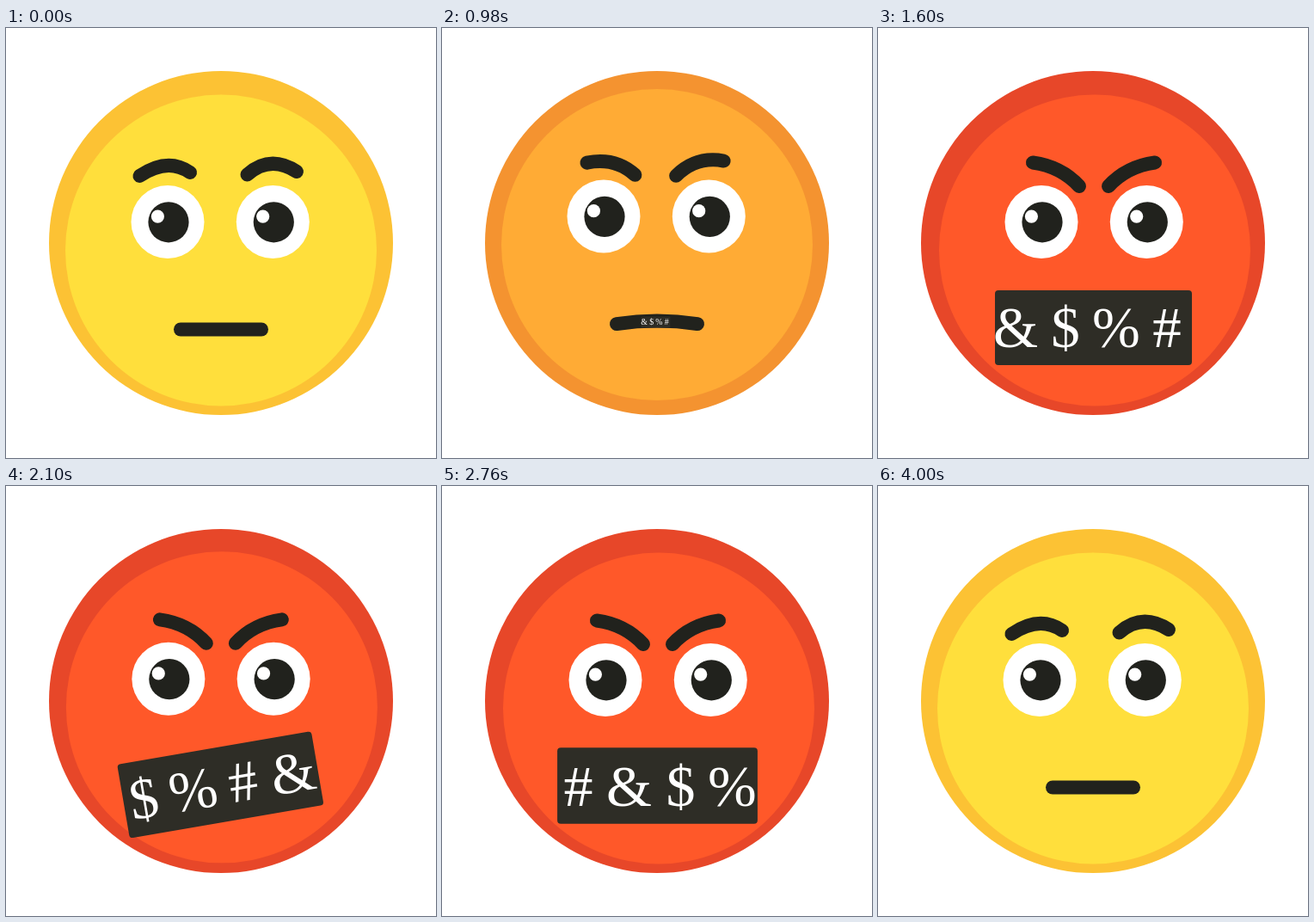
An HTML page for the animation above (4.02 s loop, 500x500 px).

```html
<!DOCTYPE html>
<html lang="en">
<head>
<meta charset="utf-8">
<title>Angry face</title>
<style>
  html, body { margin: 0; width: 100%; height: 100%; overflow: hidden; background: #fff; }
  svg { display: block; width: 100vw; height: 100vh; }
  .line { fill: none; stroke: #21221d; stroke-width: 16; stroke-linecap: round; }
  text { font: 67px "Liberation Serif", "Times New Roman", serif; fill: #fff; text-anchor: middle; }
</style>
</head>
<body>
<svg viewBox="0 0 500 500">
  <defs>
    <g id="eye">
      <circle r="42.5" fill="#fff"/>
      <circle cx="1" cy=".3" r="23.6" fill="#21221d"/>
      <circle cx="-11.6" cy="-6.4" r="7.6" fill="#fff"/>
    </g>
  </defs>
  <circle id="rim" cx="250" cy="250" r="200"/>
  <g id="face">
    <circle id="skin" cx="250" cy="258.5" r="181"/>
    <use href="#eye" x="188" y="225.5"/>
    <use href="#eye" x="310.3" y="225.5"/>
    <path id="browL" class="line"/>
    <path id="browR" class="line"/>
    <path id="mouth" class="line"/>
    <g id="sign">
      <rect x="-114.5" y="-43.5" width="229" height="87" rx="4" fill="#2e2d26"/>
      <text x="-90.5" y="23"></text>
      <text x="-32.5" y="23"></text>
      <text x="26.5" y="23"></text>
      <text x="85.5" y="23"></text>
    </g>
  </g>
</svg>
<script>
const LOOP = 4020;
const $ = id => document.getElementById(id);
const glyphs = [...document.querySelectorAll('#sign text')];
const CURSE = '&$%#';

// Brow curves: start, control and end points.
const BROWS = {
  browL: { calm: [155.5, 172, 188, 150, 214, 168], angry: [178, 156.5, 211, 161, 232, 184] },
  browR: { calm: [280.5, 170.5, 307, 147, 338, 167], angry: [266, 184, 287, 161, 320, 156.5] }
};
const SKIN = { calm: [255, 223, 60], angry: [255, 88, 41] };
const RIM = { calm: [252, 194, 52], angry: [231, 71, 41] };

const clamp = x => Math.min(1, Math.max(0, x));
const smooth = x => x * x * (3 - 2 * x);
const quadOut = x => 1 - (1 - x) * (1 - x);
const span = (t, a, b, ease = smooth) => ease(clamp((t - a) / (b - a)));
const mix = (pair, p) => pair.calm.map((v, i) => v + (pair.angry[i] - v) * p);
const rgb = (pair, p) => `rgb(${mix(pair, p).map(Math.round)})`;

// Eased value through [time, value] keys.
function track(t, keys) {
  let value = keys[0][1];
  for (let i = 1; i < keys.length; i++) {
    value += (keys[i][1] - keys[i - 1][1]) * span(t, keys[i - 1][0], keys[i][0]);
  }
  return value;
}

function draw(t) {
  const heat = span(t, 560, 1560) - span(t, 3100, 3780);
  const anger = span(t, 540, 1340) - span(t, 2880, 3980, quadOut);
  const lift = track(t, [[0, 0], [540, -23], [1217, 0]]);
  const shake = span(t, 1250, 1550) - span(t, 2800, 3150);
  const wave = Math.cos((t - 1600) / 290 * 2 * Math.PI);
  const dx = shake * (1 + wave);
  const dy = lift - shake * (1 - wave);

  $('rim').setAttribute('fill', rgb(RIM, heat));
  $('skin').setAttribute('fill', rgb(SKIN, heat));
  $('face').setAttribute('transform', `translate(${dx} ${dy})`);

  for (const id in BROWS) {
    const [x, y, ...rest] = mix(BROWS[id], anger);
    $(id).setAttribute('d', `M${x} ${y}Q${rest}`);
  }
  $('mouth').setAttribute('d', `M203 350.5Q250 ${350.5 - 12 * anger} 297 350.5`);

  const scale = track(t, [[860, 0], [1360, 1], [2660, 1], [2780, 1.018], [3425, 0]]);
  const tilt = track(t, [[1640, 0], [2080, -10], [2400, 10], [2720, 0]]);
  $('sign').setAttribute('transform', `translate(248.5 348.5) rotate(${tilt}) scale(${scale})`);
  $('sign').setAttribute('visibility', scale > 0.002 ? 'visible' : 'hidden');

  const step = Math.min(3, Math.max(0, Math.floor((t - 1400) / 400)));
  glyphs.forEach((g, i) => { g.textContent = CURSE[(i + step) % 4]; });
}

const start = performance.now();
function tick() {
  draw((performance.now() - start) % LOOP);
  requestAnimationFrame(tick);
}
tick();
</script>
</body>
</html>
```
